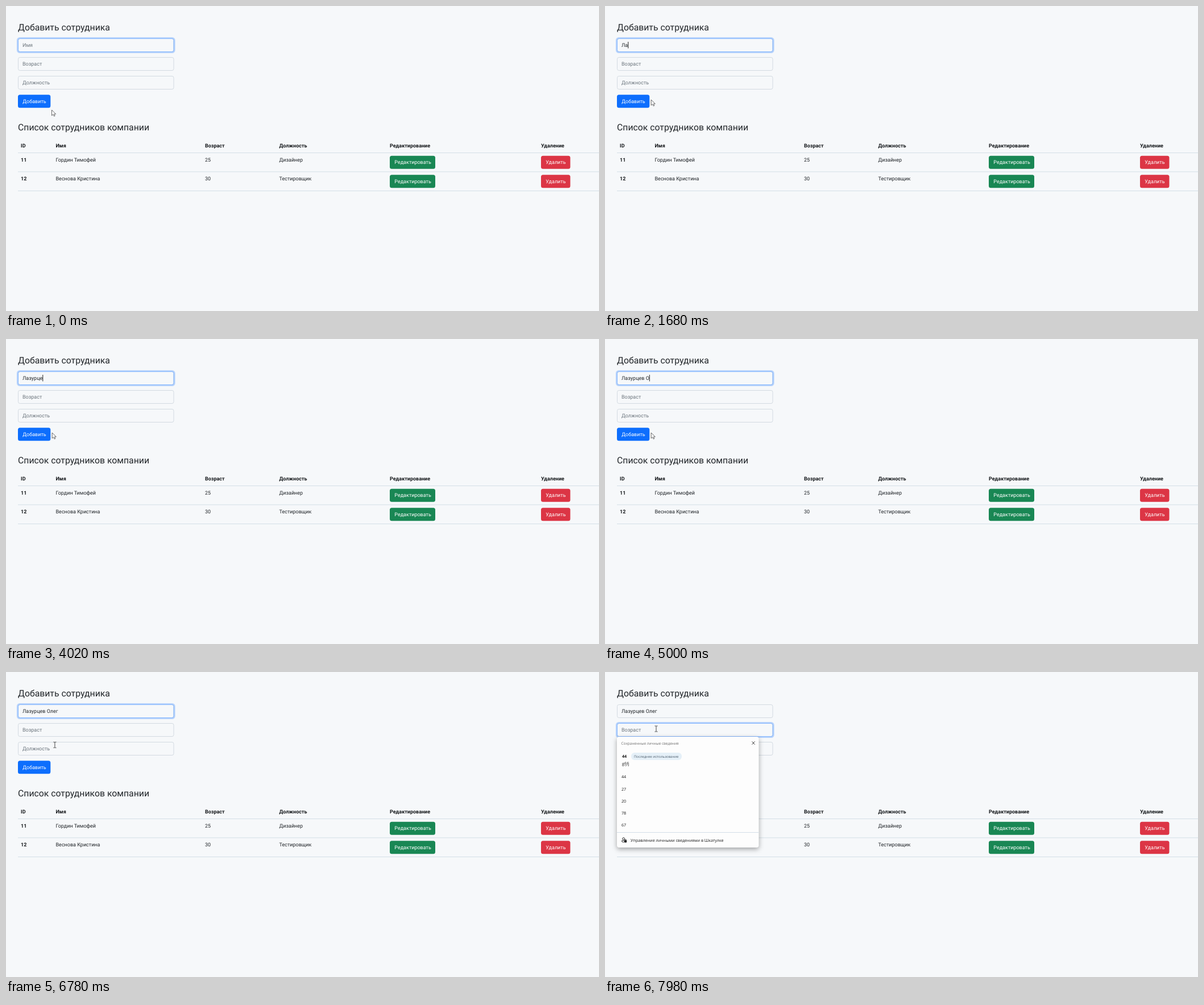
An HTML page that plays this animation: 1043 by 537 pixels, repeating every 8 s.

```html
<!DOCTYPE html>
<html lang="ru">
<head>
<meta charset="utf-8">
<title>Сотрудники</title>
<style>
html, body { margin: 0; height: 100%; overflow: hidden; background: #f6f8fa; }
svg { display: block; width: 100vw; height: 100vh; }
text { font: 9px Roboto, sans-serif; fill: #212529; white-space: pre; text-rendering: geometricPrecision; }
.title { font-size: 15.8px; }
.bold { font-weight: 700; fill: #15181b; }
.hint { fill: #6c757d; }
.light { fill: #fff; }
.ui { font: 7.2px "Open Sans", sans-serif; fill: #1b1b1b; }
.strong { font-weight: 700; }
.small { font-size: 6.5px; fill: #6a6a6a; }
.chip { font-size: 6px; fill: #4b5c6b; }
.field { fill: #f6f8fa; stroke: #d3dae1; }
.ring { fill: none; stroke: #0d6efd; stroke-opacity: .27; stroke-width: 2.6; }
.edge { fill: none; stroke: #86b7fe; }
.rule { stroke: #d3dee7; }
.caret { stroke: #222; }
#popup > rect:first-child { filter: drop-shadow(0 3px 4px rgba(0, 0, 0, .35)); }
</style>
</head>
<body>
<svg viewBox="0 0 1043 537" preserveAspectRatio="none">
  <g id="page"></g>
  <text id="name" x="29" y="72"></text>
  <g id="popup"></g>
  <path id="caret" class="caret"/>
  <path id="arrow" d="M.5 .5V10.4L2.9 8.3L4.5 11.6L6.1 10.9L4.6 7.7H7.6Z" fill="#fff" stroke="#444" stroke-width=".8"/>
  <path id="beam" d="M-2.5-5H-.7L0-4.4L.7-5H2.5M-2.5 5H-.7L0 4.4L.7 5H2.5M0-4.4V4.4" fill="none" stroke="#333" stroke-width=".9"/>
</svg>
<script>
const LOOP = 8000, CLICK = 7160, SWAP = 7210, BLINK = 530;
const NAME = 'Лазурцев Олег';
const KEYS = [1250, 1550, 2100, 2650, 3250, 3600, 3920, 4220, 4520, 4850, 5300, 5600, 5950];
const $ = id => document.getElementById(id);

const text = (x, y, s, cls = '') => `<text x="${x}" y="${y}" class="${cls}">${s}</text>`;
const rect = (x, y, w, h, r, attr) => `<rect x="${x}" y="${y}" width="${w}" height="${h}" rx="${r}" ${attr}/>`;
const rule = (x1, x2, y) => `<path class="rule" d="M${x1} ${y}H${x2}"/>`;
const button = (x, y, w, color, label) =>
  rect(x, y, w, 23, 3.5, `fill="${color}"`) + text(x + 8.3, y + 14.6, label, 'light');
const field = (y, hint, id) =>
  rect(21.5, y, 273.5, 23, 3, 'class="field"') +
  `<g id="${id}Focus">` + rect(20.2, y - 1.3, 276.1, 25.6, 4, 'class="ring"') +
  rect(21.5, y, 273.5, 23, 3, 'class="edge"') + '</g>' +
  `<g id="${id}Hint">${text(29, y + 14.5, hint, 'hint')}</g>`;

const COLS = [26, 87.5, 350, 480.5, 675, 941];
const cells = (y, items, bold) =>
  items.map((s, i) => text(COLS[i], y, s, i < bold ? 'bold' : '')).join('');
const row = (y, items) =>
  cells(y + 15.6, items, 1) + button(675, y + 5.5, 80, '#198754', 'Редактировать') +
  button(941, y + 5.5, 51.5, '#dc3545', 'Удалить') + rule(21, 1043, y + 33.7);

$('page').innerHTML =
  text(21, 43.3, 'Добавить сотрудника', 'title') +
  field(57.5, 'Имя', 'first') + field(90.5, 'Возраст', 'age') + field(123.5, 'Должность', 'role') +
  button(21, 156.3, 57.3, '#0d6efd', 'Добавить') +
  text(21, 219, 'Список сотрудников компании', 'title') +
  cells(249, ['ID', 'Имя', 'Возраст', 'Должность', 'Редактирование', 'Удаление'], 6) +
  rule(21, 1043, 258.5) +
  row(258.2, ['11', 'Гордин Тимофей', '25', 'Дизайнер']) +
  row(291.8, ['12', 'Веснова Кристина', '30', 'Тестировщик']);

$('popup').innerHTML =
  rect(21, 114, 249.5, 195, 4, 'fill="#fdfdfd"') +
  text(28.5, 127.8, 'Сохраненные личные сведения', 'ui small') +
  '<path d="M258.3 122.3l5.4 5.4m0-5.4l-5.4 5.4" stroke="#333" stroke-width=".9"/>' +
  text(30, 151, '44', 'ui strong') +
  rect(46, 142, 89, 13, 6, 'fill="#e5f0f8"') +
  text(51, 150.8, 'Последнее использование', 'ui chip') +
  text(30, 164, 'gfjfj', 'ui') +
  [44, 27, 20, 78, 67].map((n, i) => text(29, 187.4 + i * 21.25, n, 'ui')).join('') +
  rule(21, 270.5, 282.5) +
  '<circle cx="32.6" cy="293.6" r="1.9" fill="none" stroke="#222"/>' +
  '<path d="M33 297H29.6C29.4 299 31 300 33 300" fill="none" stroke="#222"/>' +
  rect(33.6, 296, 4.6, 4.2, .8, 'fill="#222"') +
  '<path d="M34.7 296v-1.2h2.4v1.2" fill="none" stroke="#222" stroke-width=".8"/>' +
  text(45, 299, 'Управление личными сведениями в Шкатулке', 'ui');

const clamp = v => Math.min(1, Math.max(0, v));
const ease = (t, a, b) => { const p = clamp((t - a) / (b - a)); return p * p * (3 - 2 * p); };
const show = (id, on) => $(id).style.display = on ? '' : 'none';

function draw(t) {
  const count = KEYS.filter(k => k <= t).length;
  const clicked = t >= CLICK;
  $('name').textContent = NAME.slice(0, count);
  show('firstHint', !count);
  show('popup', clicked);

  const swap = clamp((t - SWAP) / 150);
  $('firstFocus').style.opacity = 1 - swap;
  $('ageFocus').style.opacity = swap;
  show('roleFocus', false);

  const since = t - (clicked ? CLICK : count ? KEYS[count - 1] : -600);
  const x = clicked || !count ? 29.5 : 29.5 + $('name').getComputedTextLength();
  $('caret').setAttribute('d', `M${x} ${clicked ? 96 : 63}v11.5`);
  show('caret', since % (2 * BLINK) < BLINK);

  const rise = ease(t, 250, 700), go = ease(t, 6500, 7020);
  const mx = 80 + rise * .7 + go * 9.3, my = 182.5 - rise * 18 - go * 64.5;
  const overField = my < 113.5 || (my > 123.5 && my < 146.5);
  show('arrow', !overField);
  show('beam', overField);
  for (const id of ['arrow', 'beam']) $(id).setAttribute('transform', `translate(${mx} ${my})`);
}

const start = performance.now();
function tick() {
  draw((performance.now() - start) % LOOP);
  requestAnimationFrame(tick);
}
tick();
</script>
</body>
</html>
```
